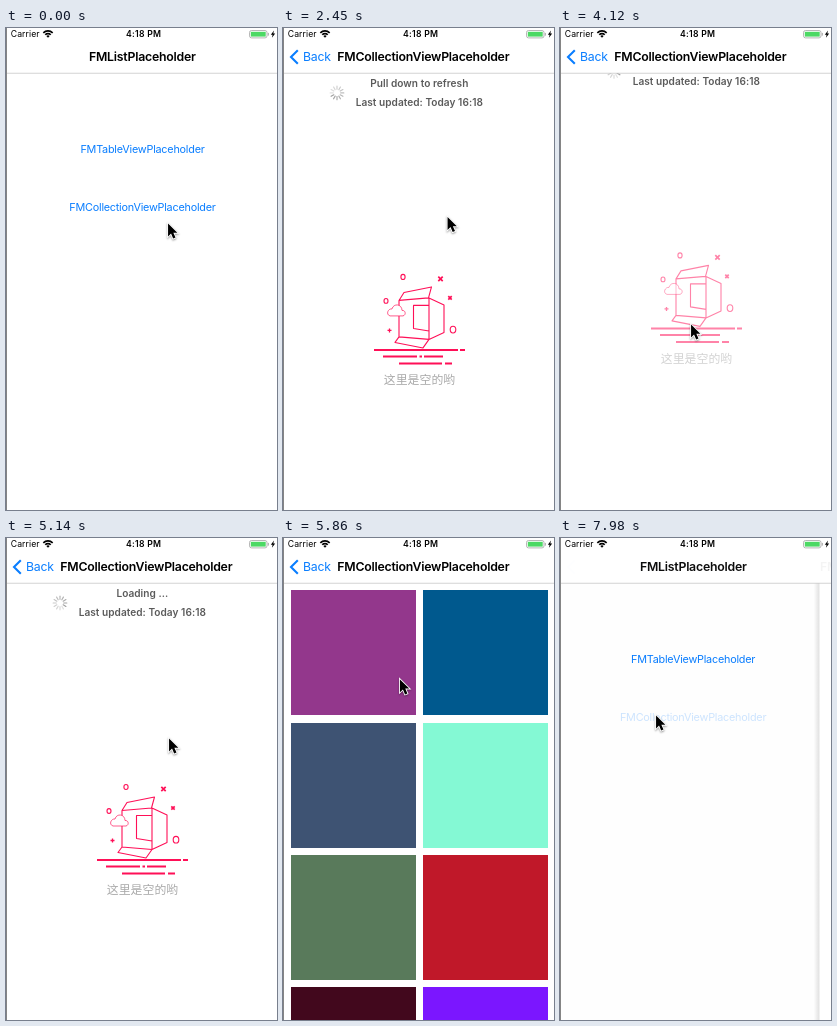
These frames come from a looping animation (271x482 px, 8 s). An HTML page with a canvas:

```html
<!DOCTYPE html>
<html lang="en">
<head>
<meta charset="utf-8">
<title>FMListPlaceholder</title>
<style>
html, body { margin: 0; width: 100%; height: 100%; overflow: hidden; background: #fff; }
canvas { display: block; width: 271px; height: 482px; }
</style>
</head>
<body>
<canvas id="stage"></canvas>
<script>
const W = 271, H = 482, NAV = 45, LOOP = 8000;
const BLUE = '#0a7eff', PINK = '#ff0f57', GRAY = '#5a5a5a';
const SANS = 'Inter, "Open Sans", sans-serif', CJK = '"Noto Sans CJK SC", "Noto Sans CJK", sans-serif';
const PUSH = 1097, POP = 7110, PUSH_AGAIN = 7957;
const PULL = 39, END_1 = 2440, END_2 = 5210, TAP = 4005;
const CELLS = ['#93378c', '#00598e', '#3e5373', '#84f9d4', '#597a5b', '#c01829', '#42081d', '#7b16ff'];

// time, x, y of the pointer tip
const POINTER = [
  [210, 161.5, 194], [500, 154, 186], [750, 147, 174], [1000, 151, 178],
  [1400, 158, 184], [1800, 164, 187.5], [3225, 164, 187.5], [3260, 161, 189],
  [3530, 161, 189], [3810, 130, 257], [4000, 130, 257], [4060, 130.5, 295],
  [4400, 130.5, 295], [5000, 162.5, 199], [5600, 162.5, 199], [5860, 116.5, 140],
  [6280, 74.5, 72], [6700, 74.5, 72], [6870, 27, 23], [6920, 27.5, 33],
  [7280, 27.5, 33], [7770, 95.5, 176]
];

const canvas = document.getElementById('stage');
const ctx = canvas.getContext('2d');
const dpr = window.devicePixelRatio || 1;
canvas.width = W * dpr;
canvas.height = H * dpr;

const clamp = v => Math.max(0, Math.min(1, v));
const ease = v => { v = clamp(v); return v * v * (3 - 2 * v); };
const spring = ms => {
  if (ms <= 0) return 0;
  const s = ms * 0.0134, v = 1 - (1 + s) * Math.exp(-s);
  return v > 0.999 ? 1 : v;
};

function faded(alpha, draw) {
  ctx.save();
  ctx.globalAlpha *= clamp(alpha);
  draw();
  ctx.restore();
}

function text(str, x, y, size, color, { weight = 400, align = 'left', track = -0.23, font = SANS } = {}) {
  ctx.font = `${weight} ${size}px ${font}`;
  ctx.letterSpacing = track + 'px';
  ctx.textAlign = align;
  ctx.fillStyle = color;
  ctx.fillText(str, x, y);
}

function rect(x, y, w, h, color) {
  ctx.fillStyle = color;
  ctx.fillRect(x, y, w, h);
}

function stroke(d, width, color) {
  ctx.lineWidth = width;
  ctx.strokeStyle = color;
  ctx.stroke(new Path2D(d));
}

function fill(d, color) {
  ctx.fillStyle = color;
  ctx.fill(new Path2D(d));
}

// 0 = list page fully open, 1 = home fully shown
function homeShare(t) {
  if (t < POP) return 1 - spring(t - PUSH);
  if (t < PUSH_AGAIN) return spring(t - POP);
  return 1 - spring(t - PUSH_AGAIN);
}

const pressed = ms => ms < 0 ? 1 : 0.2 + 0.8 * clamp((ms - 110) / 400);

function home(t, p) {
  ctx.save();
  ctx.translate(-0.3 * W * (1 - p), 0);
  text('FMTableViewPlaceholder', 136.5, 125.3, 10.84, BLUE, { align: 'center' });
  faded(pressed(t < 7000 ? t - 1030 : t - 7890), () =>
    text('FMCollectionViewPlaceholder', 136.5, 183.3, 10.84, BLUE, { align: 'center' }));
  ctx.restore();
  rect(0, 0, W, H, `rgba(0,0,0,${0.115 * (1 - p)})`);
}

function spinner(t) {
  const step = Math.floor(t / 83.3);
  ctx.lineCap = 'round';
  for (let i = 0; i < 12; i++) {
    const a = i * Math.PI / 6, c = Math.cos(a), s = Math.sin(a);
    const age = (step - i + 1200) % 12;
    faded(0.8 - age * 0.05, () =>
      stroke(`M${54 + 3.7 * c} ${65 + 3.7 * s}L${54 + 6.8 * c} ${65 + 6.8 * s}`, 1.2, '#888'));
  }
  ctx.lineCap = 'butt';
}

function emptyArt() {
  const cloud = 'M107 288H120C123.5 287 122.5 282 119 282.5C119 276 110.5 275 109 281' +
    'C105 280.5 102.5 286.5 107 288Z';
  ctx.lineJoin = 'round';
  stroke('M116 272.5L121 264.5L148.5 259L145.5 270ZV309L146 311.5V270' +
    'L161 277V304.5L146 311.5L140 320L112 314.5L116 309' +
    'M145.5 277.5H130.5V300.5L146 303', 1.1, PINK);
  fill(cloud, '#fff');
  faded(0.75, () => stroke(cloud, 0.9, PINK));
  for (const [x, y, r] of [[120, 249, 2.1], [103, 273, 2], [170, 301.7, 2.8]]) {
    ctx.beginPath();
    ctx.ellipse(x, y, r, r * 1.2, 0, 0, 7);
    ctx.lineWidth = 1.1;
    ctx.stroke();
  }
  for (const [x, y, r] of [[157.5, 251, 2.2], [167, 270, 1.7]])
    stroke(`M${x - r} ${y - r}L${x + r} ${y + r}M${x + r} ${y - r}L${x - r} ${y + r}`, 1.7, PINK);
  stroke('M104.5 302.5h4M106.5 300.5v4', 1.3, PINK);
  stroke('M91 322H175M177 322h5M100 328.5h34M136.5 328.5h2.5M141 328.5h19M116 335.5h43M162 335.5h7', 2, PINK);
  text('这里是空的哟', 136.5, 356.3, 11.9, '#aaa', { align: 'center', track: 0, font: CJK });
}

function refreshHeader(t, start, end) {
  const closing = ease((t - end) / 420);
  const label = { weight: 600, align: 'center', track: 0.04 };
  text(t >= start && t < end ? 'Loading ...' : 'Pull down to refresh', 136.3, 59, 10.1, GRAY, label);
  text('Last updated: Today 16:18', 136.3, 78.2, 10.1, GRAY, label);
  if (t >= start) faded(1 - closing, () => spinner(t));
}

function page(t, p) {
  const x = p * W;
  const [start, end] = t < 3500 ? [1250, END_1] : [TAP, END_2];
  const pull = PULL * (ease((t - start) / 250) - ease((t - end) / 420));
  ctx.save();
  ctx.translate(x, 0);
  if (p > 0) {
    const g = ctx.createLinearGradient(-6, 0, 0, 0);
    g.addColorStop(0, 'rgba(0,0,0,0)');
    g.addColorStop(1, 'rgba(0,0,0,.12)');
    rect(-6, NAV, 6, H, g);
  }
  rect(0, NAV, W, H, '#fff');
  if (t >= END_2 && t < 7890) faded(ease((t - END_2) / 420), () =>
    CELLS.forEach((c, i) => rect(8 + i % 2 * 132, Math.round(52.3 + (i >> 1) * 132.3), 125, 125, c)));
  ctx.translate(0, pull - PULL);
  if (t >= END_1 && t < END_2)
    faded(t < TAP ? 1 : 0.2 + (t - TAP) / 370, emptyArt);
  if (pull > 0) refreshHeader(t, start, end);
  ctx.restore();
}

function navBar(p) {
  const title = { weight: 600 };
  rect(0, 0, W, NAV, '#fff');
  rect(0, NAV - 0.2, W, 0.8, '#c8c8c8');
  faded(p ** 1.2, () => text('FMListPlaceholder', 83 - 73 * (1 - p), 33.4, 12.3, '#000', title));
  faded(1 - p, () => text('FMCollectionViewPlaceholder', 54.3 + 217 * p ** 1.25, 33.4, 12.3, '#000', title));
  faded((1 - p) ** 1.5, () => {
    stroke('M14.8 22.2L8 29L14.8 35.8', 2.1, BLUE);
    text('Back', 20 + 63 * p, 33.4, 12.3, BLUE);
  });
}

function statusBar() {
  text('Carrier', 4.8, 9.2, 8.67, '#000', { track: 0.07 });
  text('4:18 PM', 137.6, 9.2, 8.67, '#000', { weight: 600, align: 'center', track: 0.25 });
  for (const r of [6.6, 3.9]) {
    ctx.beginPath();
    ctx.arc(42, 9.5, r, -2.36, -0.78);
    ctx.lineWidth = 1.6;
    ctx.strokeStyle = '#000';
    ctx.stroke();
  }
  fill('M42 9.8L40.3 7.9Q42 6.6 43.7 7.9Z', '#000');
  ctx.beginPath();
  ctx.roundRect(243.5, 2.5, 17.5, 7.4, 2);
  ctx.lineWidth = 0.8;
  ctx.strokeStyle = '#a5a5a5';
  ctx.stroke();
  rect(244.8, 3.8, 14.9, 4.8, '#4cd964');
  rect(261.8, 4.9, 1, 2.7, '#a5a5a5');
  fill('M268 2.5L264.8 6.7H266.6L265.9 9.8L269.2 5.5H267.3Z', '#000');
}

function pointer(t) {
  let i = POINTER.findIndex(k => k[0] > t);
  if (i < 0) i = POINTER.length;
  const a = POINTER[Math.max(0, i - 1)], b = POINTER[Math.min(i, POINTER.length - 1)];
  const k = b[0] > a[0] ? (t - a[0]) / (b[0] - a[0]) : 0;
  const arrow = 'M.6 .8V14.6L3.8 11.6L6.1 17L8.6 15.9L6.3 10.7H10.6Z';
  ctx.save();
  ctx.translate(a[1] + (b[1] - a[1]) * k, a[2] + (b[2] - a[2]) * k + 0.8);
  ctx.scale(0.93, 0.93);
  ctx.shadowColor = 'rgba(0,0,0,.4)';
  ctx.shadowBlur = 2 * dpr;
  ctx.shadowOffsetY = dpr;
  stroke(arrow, 1.9, '#fff');
  ctx.shadowColor = 'transparent';
  fill(arrow, '#000');
  ctx.restore();
}

function draw(t) {
  const p = homeShare(t);
  ctx.setTransform(dpr, 0, 0, dpr, 0, 0);
  rect(0, 0, W, H, '#fff');
  if (p > 0) home(t, p);
  if (p < 1) page(t, p);
  navBar(p);
  statusBar();
  rect(0, 0, 1, H, '#858585');
  pointer(t);
}

const began = performance.now();
function tick() {
  draw((performance.now() - began) % LOOP);
  requestAnimationFrame(tick);
}
tick();
</script>
</body>
</html>
```
